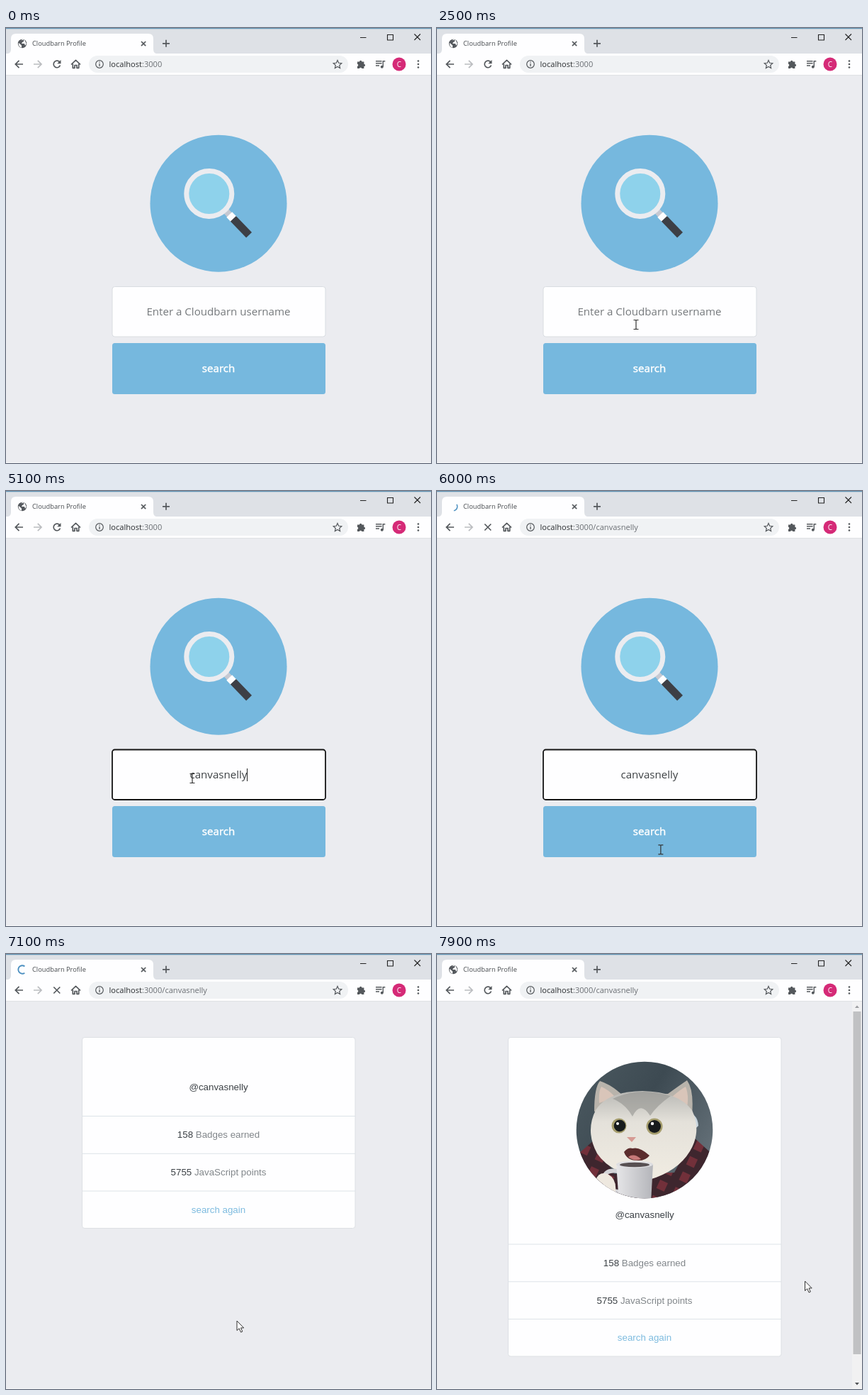
These frames come from a looping animation (600 px wide and 613 px high, 8000 ms). An HTML page:

```html
<!DOCTYPE html>
<html lang="en">
<head>
<meta charset="utf-8">
<title>Cloudbarn Profile</title>
<style>
html, body { margin: 0; width: 100%; height: 100%; overflow: hidden; background: #ebecf0 }
svg { display: block; width: 100vw; height: 100vh }
text { font-family: "Open Sans", "Noto Sans", sans-serif; white-space: pre }
.mid { text-anchor: middle }
.field { font-size: 15.1px; fill: #3c4043 }
#profile text { font: 13.33px "Liberation Sans", Arial, sans-serif; fill: #3b4045 }
#profile .soft { fill: #81868a }
.icon { fill: none; stroke: #54585c; stroke-width: 1.7 }
.thin { fill: none; stroke: #222; stroke-width: 1.1 }
</style>
</head>
<body>
<svg viewBox="0 0 600 613">
  <defs>
    <clipPath id="round"><circle cx="293" cy="248" r="96.3"/></clipPath>
    <linearGradient id="wall" x2="1" y2=".6">
      <stop stop-color="#4d5b62"/><stop offset=".5" stop-color="#3d4a52"/><stop offset="1" stop-color="#66727a"/>
    </linearGradient>
    <linearGradient id="fur" x2="0" y2="1">
      <stop stop-color="#b9b9b5"/><stop offset=".35" stop-color="#e4e1da"/><stop offset="1" stop-color="#f1ece2"/>
    </linearGradient>
    <linearGradient id="mug"><stop stop-color="#e6e6e8"/><stop offset="1" stop-color="#b4b5ba"/></linearGradient>
    <pattern id="plaid" width="24" height="24" patternUnits="userSpaceOnUse" patternTransform="rotate(25)">
      <path fill="#72303a" d="M0 0h24v24H0z"/><path fill="#2c2329" opacity=".75" d="M0 0h12v24H0zM0 0h24v11H0z"/>
    </pattern>
  </defs>

  <!-- browser window -->
  <path fill="#ebecf0" d="M0 0h600v613H0z"/>
  <path fill="#dee1e6" d="M0 0h600v37H0z"/>
  <path fill="#5f92b2" d="M0 0h600v1.2H0z"/>
  <path fill="#fefeff" d="M0 36H600V66H0zM0 36.5Q7 36.5 7 30V15Q7 8 14 8H201Q208 8 208 15V30Q208 36.5 215 36.5z"/>
  <path fill="#dfe1e4" d="M0 66h600v1H0z"/>
  <path fill="#f8f9fa" d="M0 612h600v1H0z"/>
  <text x="37" y="25.3" font-size="9.3" fill="#45494d">Cloudbarn Profile</text>
  <g id="globe">
    <circle cx="23" cy="22" r="6.2" fill="#55595e"/>
    <path fill="#fefeff" d="M18 21l4 3.500v3.300q-4-1-4.300-5.500zM21 17.300l4-.3v2l-2 1-1 2h4l1 2.500 1.200-1 .3-2-2-4-3-1.500z"/>
  </g>
  <circle id="spinner" cx="23" cy="22" r="5.700" pathLength="360" fill="none" stroke="#4b8fc0"/>
  <path class="icon" stroke-width="1.500" d="M191 19l6.200 6.200M197.200 19l-6.200 6.200M221 21.800h10M226 16.800v10"/>
  <path class="thin" d="M500 13.500h8.500M538.500 9.500h8v7.500h-8zM576.500 8.500l8.500 8.500M585 8.500l-8.500 8.500"/>

  <!-- toolbar -->
  <path class="icon" d="M24 51H13.500M18.500 45.800L13.300 51l5.200 5.200"/>
  <path class="icon" style="stroke:#bbbdc0" d="M39 51H49.500M44.800 45.800L50 51l-5.200 5.200"/>
  <g id="reload"><path class="icon" d="M76 48.300A4.800 4.800 0 1 0 76.500 52.500"/><path fill="#54585c" d="M77.500 45v5.300h-5.300z"/></g>
  <path id="stop" class="icon" d="M67.300 46.500l9 9M76.300 46.500l-9 9"/>
  <path class="icon" stroke-linejoin="round" d="M92 51.500L98.500 45.300 105 51.500M94.300 50.500V56.300H97V52.500H100V56.300H102.700V50.500"/>
  <rect x="117" y="39" width="366" height="24" rx="12" fill="#f0f2f4"/>
  <circle cx="132" cy="51" r="5.300" class="icon" style="stroke-width:1.200"/>
  <path class="icon" style="stroke-width:1.300" d="M132 50v4M132 47.500v1.300"/>
  <text x="145.500" y="55" font-size="11.100" fill="#2b2e31">localhost<tspan id="path" fill="#6a6e73"></tspan></text>
  <path class="icon" style="stroke-width:1.200" d="M468 45.500l1.700 3.800 4.100.4-3.100 2.800.9 4-3.600-2.100-3.600 2.100.9-4-3.100-2.800 4.100-.4z"/>
  <path fill="#54585c" d="M496 47.500h3a1.700 1.700 0 1 1 3.400 0h3v3.200a1.700 1.700 0 1 1 0 3.400V57h-3.200a1.700 1.700 0 0 0-3.200 0H496v-3a1.700 1.700 0 0 0 0-3.300z"/>
  <path class="icon" style="stroke-width:1.400" d="M522 46.700h8.500M522 49.800h8.500M522 53h5M532.300 54.500V46.700h3"/>
  <circle cx="530.800" cy="54.700" r="2" fill="#54585c"/>
  <circle cx="555" cy="51" r="9.500" fill="#d52a77"/>
  <text class="mid" x="555" y="54.600" font-size="10" fill="#fff">C</text>
  <g fill="#54585c"><circle cx="582" cy="46.500" r="1.300"/><circle cx="582" cy="51" r="1.300"/><circle cx="582" cy="55.500" r="1.300"/></g>

  <!-- search page -->
  <g id="search">
    <circle cx="300" cy="247.200" r="96.500" fill="#76b8de"/>
    <g transform="translate(286.800 233.500) rotate(46)">
      <path fill="#c6c9d2" d="M34-4.500h8v9h-8z"/>
      <path fill="#fefeff" d="M41-5.500h9v11h-9z"/>
      <path fill="#3d3f45" d="M49-5.500h32v11H49z"/>
      <circle r="32" fill="#8ed2eb" stroke="#ebecf0" stroke-width="7"/>
    </g>
    <rect id="box" x="150" y="364.500" width="301" height="70.500" rx="3.500" fill="#fefeff"/>
    <text id="entry" class="mid field" x="300" y="405"></text>
    <path id="caret" stroke="#222" d="M0 391v18"/>
    <rect x="150" y="444" width="301" height="72" rx="3.500" fill="#76b8de"/>
    <text class="mid field" x="300" y="485.300" style="fill:#fff;stroke:#fff;stroke-width:.45">search</text>
  </g>

  <!-- profile page -->
  <g id="profile">
    <rect id="card" y="117.500" width="385.500" rx="3.500" fill="#fefeff" stroke="#dde0e4"/>
    <g id="photo" clip-path="url(#round)">
      <path fill="url(#wall)" d="M190 145h210v210H190z"/>
      <path fill="#c9d6df" d="M350 222q18 2 19 20l-14 14z"/>
      <path fill="url(#plaid)" d="M190 290L222 262 250 310 335 308 362 258 392 285V350H190z"/>
      <path fill="#b8b3ab" d="M222 222Q222 188 230 179 246 184 262 199L326 197Q344 184 353 178 363 192 360 226z"/>
      <path fill="#d9c5b9" d="M229 210Q228 193 232 187 242 191 252 202zM332 201Q345 190 351 187 356 199 353 217z"/>
      <path fill="url(#fur)" d="M224 220Q240 194 290 193 340 194 360 220 374 250 357 278 340 306 300 318 246 311 226 281 209 250 224 220z"/>
      <path fill="#8e8e8b" opacity=".55" d="M248 204Q285 186 330 200 310 214 301 228 287 206 276 229 266 211 248 204z"/>
      <g fill="#a59d6d"><circle cx="257" cy="242" r="10.500"/><circle cx="307" cy="243" r="11.500"/></g>
      <g fill="#171b1c"><circle cx="258" cy="242" r="8.300"/><circle cx="307" cy="243" r="9"/></g>
      <g fill="#fff"><circle cx="255" cy="239" r="2"/><circle cx="304" cy="239" r="2.200"/></g>
      <path fill="#d69b94" d="M268 258h13l-6 7z"/>
      <path fill="#5b2c2d" d="M264 279Q270 272 276 274 286 271 300 284 294 292 282 291 268 291 264 279z"/>
      <path fill="#c77979" d="M270 286q8-6 18 3-9 4-18-3z"/>
      <path fill="none" stroke="#d3d3d7" stroke-width="6" d="M256 306Q235 303 236 318 239 334 257 335"/>
      <path fill="url(#mug)" d="M253 296H305L302 350H257z"/>
      <ellipse cx="279" cy="296.500" rx="26" ry="5" fill="#dedee1"/>
      <ellipse cx="279" cy="297" rx="21" ry="3.300" fill="#575052"/>
      <path fill="#eee8df" d="M224 318q5-12 17-8 13 7 11 25l-23 8z"/>
    </g>
    <g id="rows">
      <path stroke="#dde3e8" d="M107.500 228.500h385.500M107.500 281.300h385.500M107.500 334h385.500"/>
      <g class="mid">
        <text id="handle" x="300" y="191.500"></text>
        <text x="300" y="259">158 <tspan class="soft">Badges earned</tspan></text>
        <text x="300" y="312">5755 <tspan class="soft">JavaScript points</tspan></text>
        <text x="300" y="364.500" style="fill:#7dbbdf">search again</text>
      </g>
    </g>
    <g id="bar">
      <path fill="#f1f1f2" d="M586 67h14v545h-14z"/>
      <path fill="#c0c1c3" d="M587.500 81h11v483h-11z"/>
      <path fill="#9b9da0" d="M590 76l3-3.500 3 3.500z"/>
      <path fill="#505356" d="M590 604l3 3.500 3-3.500z"/>
    </g>
  </g>

  <path id="arrow" fill="#fff" stroke="#333" d="M0 0V13.500L3.200 10.700 5.600 16 7.800 15 5.500 9.900H9.700Z"/>
  <path id="beam" fill="none" stroke="#333" stroke-width="1.200" d="M-3.500-6.500h2.500q1 0 1 1 0-1 1-1h2.500M0-5.500v11M-3.500 6.500h2.500q1 0 1-1 0 1 1 1h2.500"/>
</svg>
<script>
const LOOP = 8000, STEP = 100;
const ENTER = 5300, PAGE = 7100, LOADED = 7300;
const user = 'canvasnelly', hint = 'Enter a Cloudbarn username';
const $ = id => document.getElementById(id);
const show = (id, on) => $(id).style.display = on ? '' : 'none';
const set = (id, attrs) => { for (const k in attrs) $(id).setAttribute(k, attrs[k]); };
const write = (id, s) => { if ($(id).textContent !== s) $(id).textContent = s; };

// pointer stops: time, x, y
const stops = [
  [1800, 401, 21], [1900, 416, 13], [2000, 416, 13], [2500, 281, 418],
  [2600, 281, 418], [2900, 263, 405], [5600, 263, 405], [6100, 322, 517],
  [6300, 327, 523], [7000, 327, 523], [7100, 326, 517], [7300, 326, 517], [7900, 519.5, 461]
];

function pointer(t) {
  const i = stops.findIndex(s => s[0] > t);
  if (i < 0) return stops.at(-1).slice(1);
  const [t0, x0, y0] = stops[i - 1], [t1, x1, y1] = stops[i];
  const p = (t - t0) / (t1 - t0), e = p * p * (3 - 2 * p);
  return [x0 + (x1 - x0) * e, y0 + (y1 - y0) * e];
}

function typed(t) {
  if (t < 3800) return 0;
  if (t < 4200) return t < 4000 ? 1 : 2;
  return Math.min(user.length, 3 + (t - 4200) / STEP);
}

function caretOn(t) {
  if (t < 2700 || t >= ENTER) return false;
  return t < 3200 || t >= 3700;
}

function drawSpinner(t) {
  const waiting = t < PAGE;
  const sweep = waiting ? 115 : 250;
  const start = waiting ? 55 - (t - 7000) * 360 / 1320 : 55 + (t - PAGE) * 0.36;
  set('spinner', {
    'stroke-dasharray': `${sweep} ${360 - sweep}`,
    'stroke-width': waiting ? 1.5 : 1.9,
    transform: `rotate(${start} 23 22)`
  });
}

function draw(t) {
  const loading = t >= ENTER && t < LOADED, done = t >= LOADED, focus = t >= 2700;
  show('globe', !loading);
  show('spinner', loading);
  show('reload', !loading);
  show('stop', loading);
  show('search', t < PAGE);
  show('profile', t >= PAGE);
  if (loading) drawSpinner(t);
  write('path', ':3000' + (t >= ENTER ? '/' + user : ''));

  if (t < PAGE) {
    const n = typed(t);
    write('entry', n ? user.slice(0, n) : hint);
    $('entry').style.fill = n ? '#3c4043' : '#74787b';
    set('box', { stroke: focus ? '#151515' : '#d9dde1', 'stroke-width': focus ? 1.8 : 1 });
    const x = 300.5 + (n ? $('entry').getComputedTextLength() / 2 : 0);
    set('caret', { transform: `translate(${Math.floor(x) + 0.5})` });
    show('caret', caretOn(t));
  } else {
    set('card', { x: done ? 100.5 : 107.5, height: done ? 449.5 : 269 });
    set('rows', { transform: done ? 'translate(-7 180.500)' : '' });
    show('photo', done);
    show('bar', done);
  }

  const visible = t >= 1800;
  let beam = false;
  if (visible) {
    const [x, y] = pointer(t);
    beam = t < PAGE && y > 364;
    set(beam ? 'beam' : 'arrow', { transform: `translate(${x} ${y})` });
  }
  show('beam', beam);
  show('arrow', visible && !beam);
}

write('handle', '@' + user);
$('profile').querySelector('.mid').style.textAnchor = 'middle';
const begin = performance.now();
function tick() {
  const t = (performance.now() - begin) % LOOP;
  draw(Math.floor(t / STEP) * STEP);
  requestAnimationFrame(tick);
}
tick();
</script>
</body>
</html>
```
